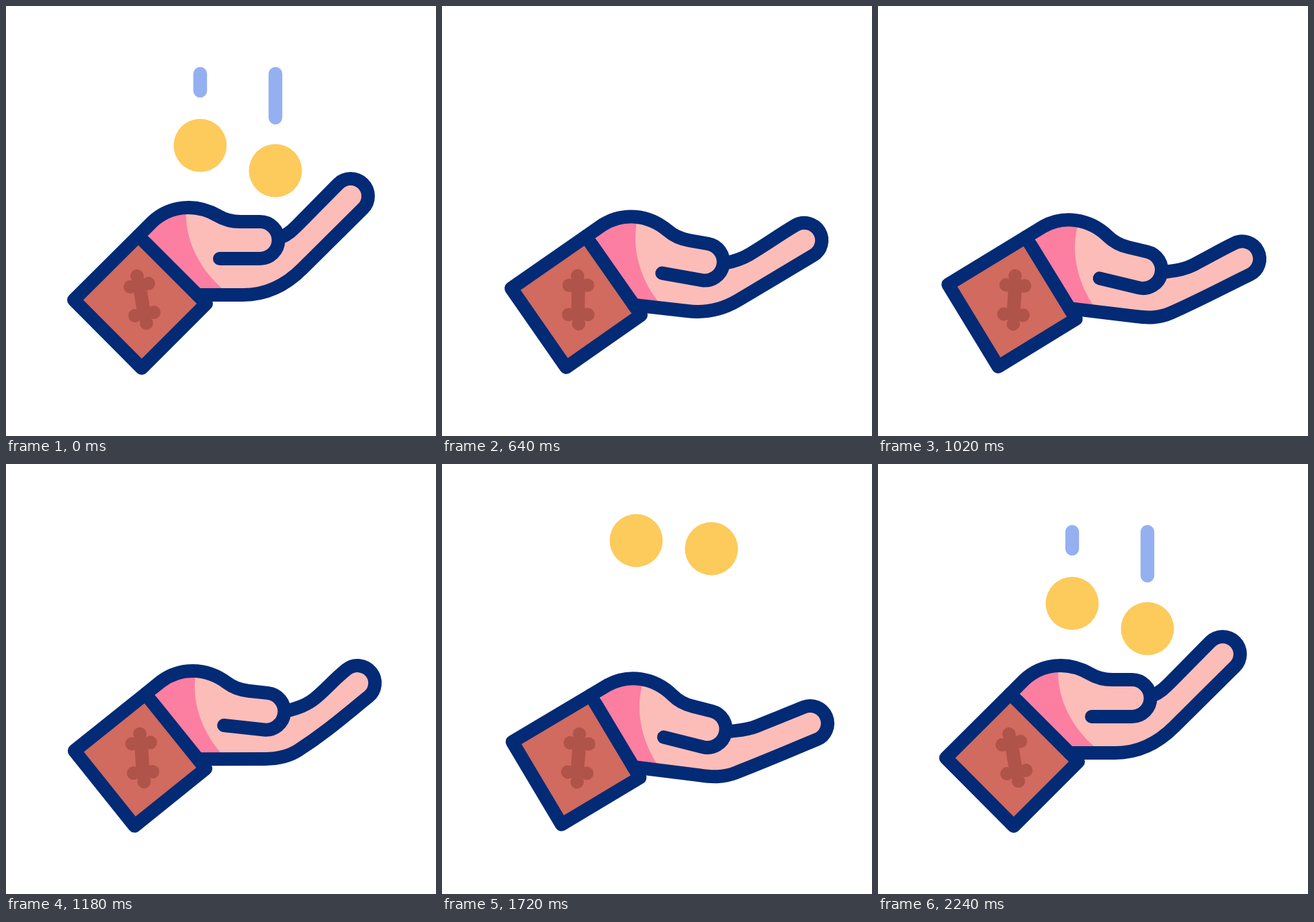
Animation, 640 px wide and 640 px high, one loop 2400 ms. Source, as an HTML page with a canvas:

```html
<!DOCTYPE html>
<html lang="en">
<head>
<meta charset="utf-8">
<title>Coin toss</title>
<style>
html, body { margin: 0; width: 100%; height: 100%; overflow: hidden; background: #fff; }
canvas { display: block; width: 640px; height: 640px; }
</style>
</head>
<body>
<canvas id="stage" width="640" height="640"></canvas>
<script>
const ctx = document.getElementById('stage').getContext('2d');
const LOOP = 2400;
const NAVY = '#032a75', SKIN = '#fcbdb9', SHADE = '#fc7ea1', CUFF = '#d16a5f',
      BONE = '#b05349', GOLD = '#fdca5c', BLUE = '#95b0f1';
const rad = a => a * Math.PI / 180;
const clamp = p => Math.max(0, Math.min(1, p));
const span = (t, a, b) => clamp((t - a) / (b - a));

// Finger poses: tip x, y, angle; palm x, y, angle; lower knuckle x, y, angle; upper knuckle x, y, angle
const rest    = [513, 283, -45,   353, 430, 0,    441, 391, -45,     436, 324, -45];
const open    = [518, 291, -40.7, 365, 425, -3,   436.5, 396, -40.7, 441, 326, -40.7];
const flat    = [525.5, 304, -35.5, 381, 418, -5, 435, 401, -35.5,   448, 327, -35.5];
const curl    = [509, 292, -45,   384, 419, -6,   432, 401, -39,     450, 320, -47];
const flick   = [503.5, 288, -53, 387.5, 419, -6, 426, 404, -34,     446, 318.5, -52];

// time, arm angle, finger pose
const keys = [
  [0, 0, rest], [120, 0, rest], [440, 0.35, rest], [640, 10, open], [840, 19.4, flat],
  [1180, 6.2, curl], [1490, -1.35, flick], [1760, 15, flat], [1960, 6.2, open],
  [2160, -0.5, rest], [2240, 0, rest], [2400, 0, rest]
].map(([t, angle, pose]) => ({ t, v: [angle, ...pose] }));

// Monotone cubic interpolation through the keys
function slope(i, c) {
  if (i === 0 || i === keys.length - 1) return 0;
  const rate = j => (keys[j + 1].v[c] - keys[j].v[c]) / (keys[j + 1].t - keys[j].t);
  const a = rate(i - 1), b = rate(i);
  return a * b <= 0 ? 0 : 2 * a * b / (a + b);
}
function sample(t) {
  let i = 0;
  while (i < keys.length - 2 && t >= keys[i + 1].t) i++;
  const a = keys[i], b = keys[i + 1], h = b.t - a.t, p = (t - a.t) / h, q = 1 - p;
  return a.v.map((v, c) =>
    v * (1 + 2 * p) * q * q + b.v[c] * p * p * (3 - 2 * p) +
    h * p * q * (q * slope(i, c) - p * slope(i + 1, c)));
}

// Cubic from one point to another, leaving and arriving at given angles
function bend(path, x0, y0, a0, x1, y1, a1) {
  const d = Math.hypot(x1 - x0, y1 - y0) * 0.36;
  path.bezierCurveTo(
    x0 + d * Math.cos(rad(a0)), y0 + d * Math.sin(rad(a0)),
    x1 - d * Math.cos(rad(a1)), y1 - d * Math.sin(rad(a1)), x1, y1);
}

const back = 'M197 342L218 321C244 297 282 293 315 312C325 318 337 321 349 321H378A27.5 27.5 0 0 1 ';
const thumb = new Path2D(back + '378 376H318');
const shade = new Path2D('M180 290H268V311C268 350 289 396 330 427L330 450H280Z');
const cuff = new Path2D('M101 437.5L197 342L298 443L202 539Z');

function fingers(path, [tx, ty, ta, px, py, pa, qx, qy, qa, ux, uy, ua]) {
  const r = 26, nx = -r * Math.sin(rad(ta)), ny = r * Math.cos(rad(ta));
  bend(path, 408, 345, -22, ux, uy, ua);
  bend(path, ux, uy, ua, tx - nx, ty - ny, ta);
  path.arc(tx, ty, r, rad(ta - 90), rad(ta + 90));
  bend(path, tx + nx, ty + ny, ta + 180, qx, qy, qa + 180);
  bend(path, qx, qy, qa + 180, px, py, pa + 180);
  path.lineTo(285, 430);
}

function dot(x, y, r, color) {
  ctx.fillStyle = color;
  ctx.beginPath();
  ctx.arc(x, y, r, 0, 7);
  ctx.fill();
}
function line(x0, y0, x1, y1, width, color) {
  ctx.strokeStyle = color;
  ctx.lineWidth = width;
  ctx.beginPath();
  ctx.moveTo(x0, y0);
  ctx.lineTo(x1, y1);
  ctx.stroke();
}

function drawArm(t) {
  const [angle, ...pose] = sample(t);
  ctx.save();
  ctx.translate(200, 440.5);
  ctx.rotate(rad(angle));
  ctx.translate(-200, -440.5);

  const body = new Path2D(back + '405.5 348.5L408 345');
  fingers(body, pose);
  body.closePath();
  ctx.fillStyle = SKIN;
  ctx.fill(body);
  ctx.save();
  ctx.clip(body);
  ctx.fillStyle = SHADE;
  ctx.fill(shade);
  ctx.restore();

  ctx.fillStyle = CUFF;
  ctx.fill(cuff);
  for (const [x, y] of [[185, 418], [195, 402], [212, 413], [192, 461], [209, 472], [220, 456]])
    dot(x, y, 10, BONE);
  line(198, 412, 206, 461, 20, BONE);

  const edge = new Path2D('M408 345');
  fingers(edge, pose);
  ctx.strokeStyle = NAVY;
  ctx.lineWidth = 20;
  for (const p of [edge, thumb, cuff]) ctx.stroke(p);
  ctx.restore();
}

function coinY(t, home) {
  const top = home - 129;
  if (t < 120) return home;
  if (t < 1000) return home + 8.7e-4 * (t - 120) ** 2;
  if (t < 1500) return Infinity;
  if (t < 1655) return top + (370 - top) * (1 - span(t, 1500, 1655)) ** 2;
  const p = span(t, 1655, 2115);
  return top + 129 * (0.3 * p + 0.35 * (1 - Math.cos(Math.PI * p)));
}

function drawTrail(t, x, length) {
  const cut = span(t, 120, 330);
  if (t < 1000) {
    if (cut < 1) line(x, 101 + length * cut, x, 101.01 + length, 20.5, BLUE);
  } else if (t >= 1830) {
    const grown = 1 - (1 - span(t, 1830, 2120)) ** 1.4;
    line(x, 101, x, 101.01 + length * grown, 20.5, BLUE);
  }
}

// x, resting height, trail length, delay
const coins = [[289, 207.5, 25, 120], [401, 245, 65, 0]];

function draw(t) {
  ctx.fillStyle = '#fff';
  ctx.fillRect(0, 0, 640, 640);
  ctx.lineCap = ctx.lineJoin = 'round';
  for (const [x, home, , lag] of coins) {
    const y = coinY(t - lag, home);
    if (y < 385) dot(x, y, 39.5, GOLD);
  }
  for (const [x, , length, lag] of coins) drawTrail(t - lag, x, length);
  drawArm(t);
}

function tick() {
  draw(performance.now() % LOOP);
  requestAnimationFrame(tick);
}
tick();
</script>
</body>
</html>
```
